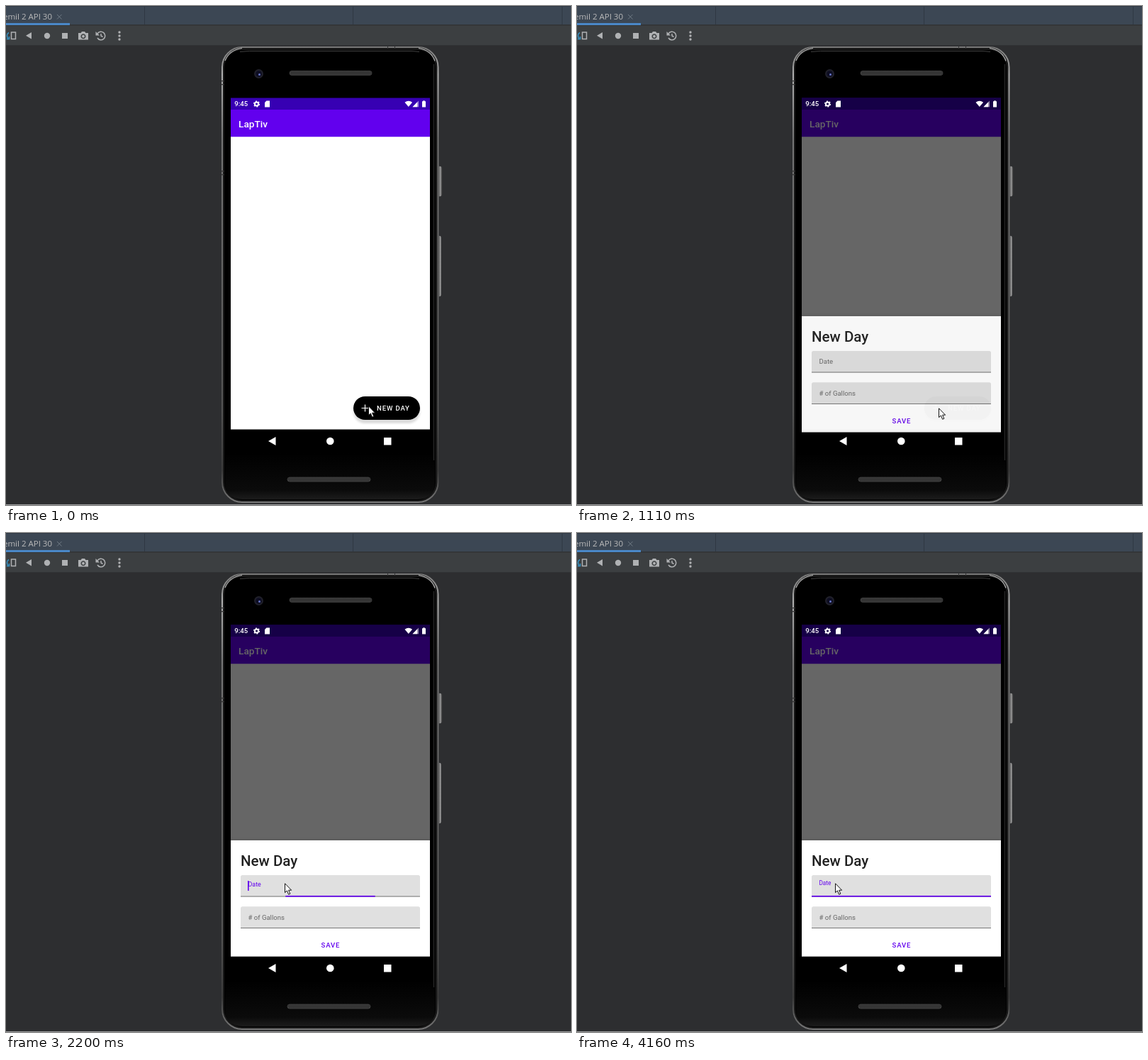
Write an HTML page that moves like this. It is 797 px wide and 703 px high and loops after 8 s.

```html
<!DOCTYPE html>
<html lang="en">
<head>
<meta charset="utf-8">
<style>
  html, body { margin: 0; width: 100%; height: 100%; overflow: hidden; background: #2d2e30; }
  svg { display: block; width: 797px; height: 703px; }
  text { font-family: Roboto, sans-serif; font-size: 9.57px; }
  .medium { font-weight: 500; }
  .caps { font-weight: 500; letter-spacing: .85px; }
  .hint { fill: #666; }
</style>
</head>
<body>
<svg viewBox="0 0 797 703">
  <defs>
    <linearGradient id="rim" x2="0" y2="1">
      <stop offset="0" stop-color="#777"/><stop offset=".06" stop-color="#b0b0b0"/>
      <stop offset=".2" stop-color="#777"/><stop offset=".8" stop-color="#555"/>
      <stop offset=".93" stop-color="#3c3c3c"/><stop offset="1" stop-color="#777"/>
    </linearGradient>
    <linearGradient id="chin" x2="0" y2="1">
      <stop offset="0" stop-color="#000"/><stop offset=".8" stop-color="#0b0b0b"/><stop offset="1" stop-color="#1c1c1c"/>
    </linearGradient>
    <linearGradient id="key"><stop offset="0" stop-color="#333"/><stop offset=".55" stop-color="#999"/><stop offset="1" stop-color="#444"/></linearGradient>
    <pattern id="mesh" width="2" height="2" patternUnits="userSpaceOnUse">
      <path fill="#151515" d="M0 0h2v2h-2z"/><path fill="#555" d="M0 0h1v1h-1zM1 1h1v1h-1z"/>
    </pattern>
    <clipPath id="screen"><path d="M317 129.5h281v499.5h-281z"/></clipPath>
  </defs>

  <!-- Emulator window -->
  <path fill="#3c4754" d="M0 0h797v27H0z"/>
  <path fill="#2f3843" d="M0 0h797v1H0zM195 1h1v25h-1zM489 1h1v25h-1zM784 1h1v25h-1z"/>
  <path fill="#323537" d="M0 26h797v1.500H0z"/>
  <path fill="#4a88c7" d="M0 24h90v3H0z"/>
  <path fill="#3c3f41" d="M0 27.500h797v27.500H0z"/>
  <path fill="#303234" d="M0 55h797v1H0z"/>
  <path fill="#9a9b9c" d="M0 702h797v1H0z"/>
  <text x="65" y="19" text-anchor="end" fill="#bbb" style="font:11.500px 'Open Sans',sans-serif">Vemil 2 API 30</text>
  <path d="M72 12l6.500 6.500m0-6.500l-6.500 6.500" stroke="#6f7a84"/>
  <g fill="#afb1b3">
    <path d="M36 37v9.500l-8-4.750zM79 38h8v8h-8z"/>
    <circle cx="58" cy="42" r="4.200"/>
    <path fill-rule="evenodd" d="M102 38h3.500l1.500-2h4l1.500 2h3.500v9.500h-14zM109 39.200a3.500 3.500 0 1 0 .01 0z"/>
    <circle cx="109" cy="42.700" r="2"/>
    <circle cx="160" cy="37" r="1.700"/><circle cx="160" cy="42" r="1.700"/><circle cx="160" cy="47" r="1.700"/>
    <path d="M126.500 36v5.500h5.500z"/>
  </g>
  <g fill="none" stroke="#afb1b3" stroke-width="1.500">
    <path d="M7.500 37h6v9.500h-6z"/>
    <path d="M129 39a5.800 5.800 0 1 1 0 6M134 39v3l2.500 1.500"/>
    <path stroke="#3592c4" d="M4 37.500a5 5 0 0 0-1 8M1 46.500h3.500v-3.500"/>
  </g>

  <!-- Phone body -->
  <path fill="url(#key)" d="M610 226q5-1 5 3v36q0 4-5 3zM609.500 324q4.500-1 4.500 3v79q0 4-4.500 3z"/>
  <rect x="304" y="57" width="306.500" height="643" rx="29" fill="#191919"/>
  <rect x="305" y="58" width="304.500" height="641" rx="28" fill="none" stroke="url(#rim)" stroke-width="2"/>
  <rect x="308" y="62" width="298" height="634" rx="25" fill="#000"/>
  <path fill="url(#chin)" d="M309 630h296v40q0 25-25 25h-246q-25 0-25-25z"/>
  <path fill="none" stroke="#414141" d="M330 64.500q14-1.500 27-1h202q14-.5 24 1"/>
  <path fill="none" stroke="#252525" stroke-width="1.500" d="M603.500 82v558"/>
  <path stroke="#bbb" stroke-width="1.200" fill="none" d="M309 77q6-15 24-17.500M582 59.500q18 3 23 18"/>
  <path fill="#333" d="M304 105h4v1.200h-4zM304 110h4v1.200h-4zM304 232h4v1.200h-4zM304 237h4v1.200h-4zM538 57h1v3h-1zM548 57h1v3h-1z"/>
  <circle cx="356.500" cy="95.500" r="6.500" fill="#20202a"/>
  <circle cx="356.500" cy="95.500" r="4.300" fill="#0d0d22"/>
  <circle cx="357.500" cy="96.500" r="1.500" fill="#6675c8"/>
  <g fill="url(#mesh)" stroke="#444" stroke-width=".8">
    <rect x="400" y="91.500" width="116" height="6" rx="3"/>
    <rect x="397" y="664" width="117" height="6" rx="3"/>
  </g>

  <g clip-path="url(#screen)">
    <path d="M317 129h281v500h-281z"/>
    <path fill="#fff" d="M317 184h281v412.500h-281z"/>
    <path fill="#3700b3" d="M317 129h281v17h-281z"/>
    <path fill="#6200ee" d="M317 146h281v38.300h-281z"/>
    <text x="328" y="170.500" class="medium" fill="#fff" style="font-size:13.680px">LapTiv</text>
    <g id="fab">
      <rect x="490" y="550" width="94" height="33" rx="16.500"/>
      <path d="M501.500 566.500h10m-5-5v10" stroke="#fff" stroke-width="1.200"/>
      <text x="523" y="570" class="caps" fill="#fff">NEW DAY</text>
    </g>
    <rect id="scrim" x="317" y="129" width="281" height="467.500"/>

    <g id="sheet">
      <path fill="#fff" d="M317 0h281v163.500h-281z" style="filter:drop-shadow(0 -1px 2px rgba(0,0,0,.12))"/>
      <text x="331" y="36" class="medium" fill="#212121" style="font-size:20.500px">New Day</text>
      <g fill="#e0e0e0">
        <path id="field" d="M331 79.500v-28q0-2.500 2.500-2.500h248q2.500 0 2.500 2.500v28z"/>
        <use href="#field" y="44.300"/>
      </g>
      <path fill="#777" d="M331 78.600h253v1h-253zM331 123h253v1h-253z"/>
      <rect id="focusLine" y="77.900" height="1.700" fill="#6200ee"/>
      <text id="dateLabel" x="341.500"></text>
      <text x="341.500" y="111.700" class="hint"># of Gallons</text>
      <text x="444.600" y="151" class="caps" fill="#6200ee">SAVE</text>
      <rect id="caret" x="341" y="57" width="1.600" height="14" fill="#6200ee"/>
    </g>

    <!-- System bars stay above the dimmed window -->
    <g fill="#fff">
      <text x="322.300" y="141.300" class="medium">9:45</text>
      <circle cx="353.500" cy="138" r="2.600" fill="none" stroke="#fff" stroke-width="2"/>
      <circle cx="353.500" cy="138" r="3.900" fill="none" stroke="#fff" stroke-width="1.400" stroke-dasharray="2.040"/>
      <path d="M367.500 133.500h4.500v9h-7v-6.500zM562.500 135.800q5.300-4 10.600 0l-5.300 6.300z"/>
      <path d="M587 134.200h1.500v-1h2v1h1.500v8.300h-5z"/>
      <path d="M582 133.500v8.700h-8.500z" opacity=".55"/>
      <path d="M580 135.600v6.600h-6.500z"/>
      <path d="M380.500 607v12l-10.500-6zM533 608h10.500v10.500h-10.500z"/>
      <circle cx="457.300" cy="613" r="5.300"/>
    </g>
  </g>

  <path id="cursor" fill="#fff" stroke="#111" d="M.5.800v12.800l2.900-2.700 2.200 5.300 2.200-.9-2.200-5.100h4z"/>
</svg>
<script>
const LOOP = 8000;
// Each step holds until the next one and keeps earlier values.
const steps = [
  { at: 0, cursor: [511, 563], sheetY: 633, sheet: 0, scrim: 0, focus: 0, caret: 0, lift: 5 },
  { at: 560, cursor: [510, 566], sheetY: 470, sheet: .61, scrim: .12, lift: 2 },
  { at: 680, sheetY: 446, sheet: .84, scrim: .28 },
  { at: 1110, sheetY: 437, sheet: .95, scrim: .6 },
  { at: 1260, sheetY: 433, sheet: 1 },
  { at: 1380, cursor: [422, 506] },
  { at: 1530, cursor: [402, 499] },
  { at: 1650, cursor: [393, 496] },
  { at: 1800, cursor: [393, 493] },
  { at: 2050, caret: 1 },
  { at: 2200, focus: .5 },
  { at: 2330, focus: 1 },
  { at: 2480, caret: 0 },
  { at: 4030, cursor: [374, 493] },
  { at: 4160, cursor: [364, 493] },
];
const el = id => document.getElementById(id);
const mix = (a, b, t) => a + (b - a) * t;
const [fab, scrim, sheet, focusLine, dateLabel, caret, cursor] =
  ['fab', 'scrim', 'sheet', 'focusLine', 'dateLabel', 'caret', 'cursor'].map(el);
dateLabel.textContent = 'Date';

function draw(time) {
  const s = Object.assign({}, ...steps.filter(step => step.at <= time));
  fab.style.filter = `drop-shadow(0 ${s.lift}px 1.5px rgba(0,0,0,.14))`;
  scrim.setAttribute('opacity', s.scrim);
  sheet.setAttribute('opacity', s.sheet);
  sheet.setAttribute('transform', `translate(0 ${s.sheetY})`);
  focusLine.setAttribute('x', 457.5 - 126.5 * s.focus);
  focusLine.setAttribute('width', 253 * s.focus);
  dateLabel.setAttribute('y', mix(67.2, 62.8, s.focus));
  dateLabel.style.fontSize = mix(9.57, 8.2, s.focus) + 'px';
  dateLabel.style.fill = s.focus ? '#6200ee' : '#666';
  caret.setAttribute('opacity', s.caret);
  cursor.setAttribute('transform', `translate(${s.cursor})`);
}

const start = performance.now();
function tick() {
  draw((performance.now() - start) % LOOP);
  requestAnimationFrame(tick);
}
tick();
</script>
</body>
</html>
```
